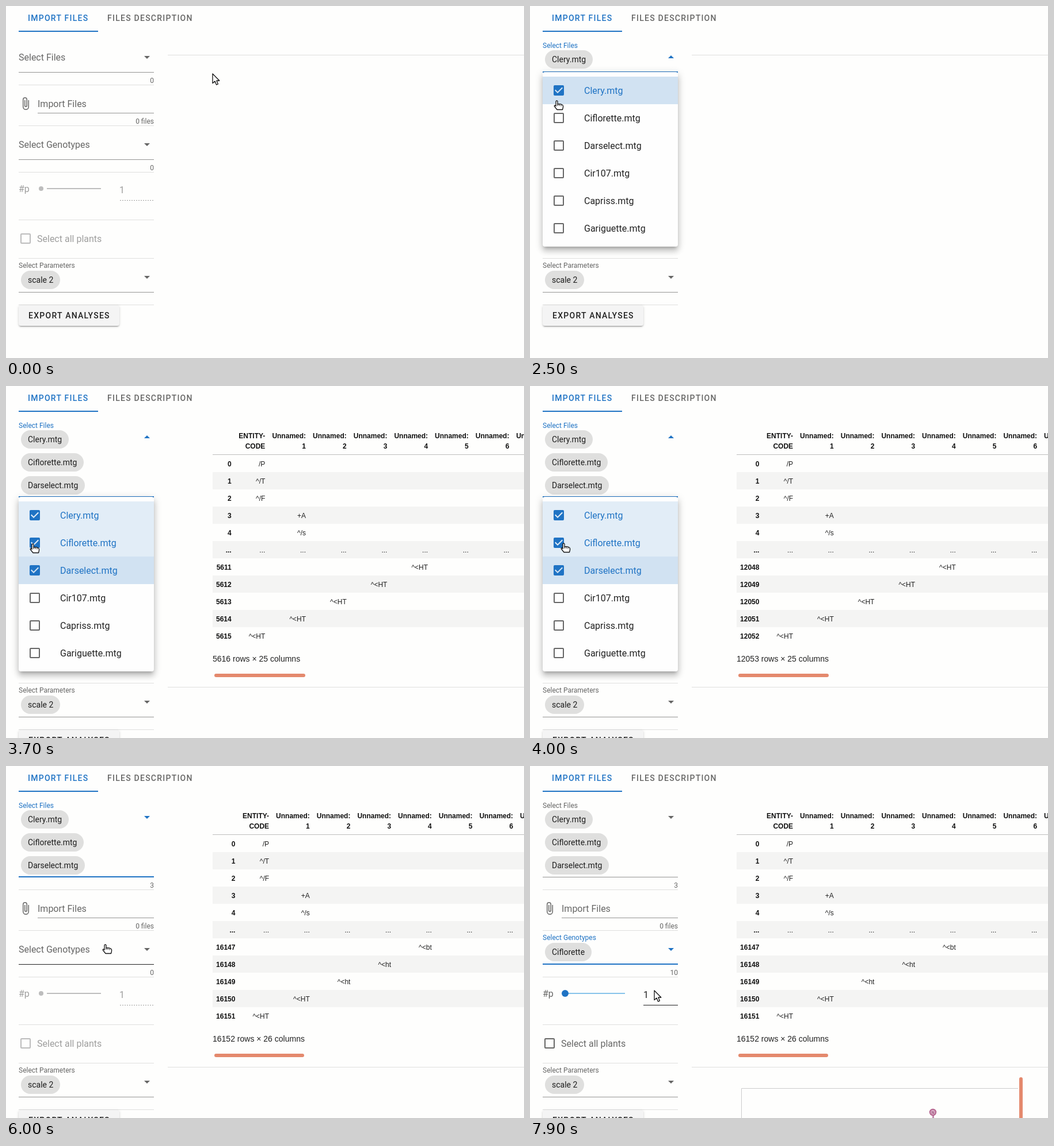
An HTML page for the animation above (8 s loop, 900 by 613 pixels).

```html
<!DOCTYPE html>
<html lang="en">
<head>
<meta charset="utf-8">
<title>Import files</title>
<style>
html, body { margin: 0; width: 100%; height: 100%; overflow: hidden; background: #fefefd; }
#stage { position: relative; width: 900px; height: 613px; overflow: hidden; font: 16px Roboto, sans-serif; }
#stage div, #stage p, #stage svg { position: absolute; margin: 0; white-space: pre; }
#stage svg { width: 1px; height: 1px; overflow: visible; }
#stage .layer { left: 0; width: 900px; }
#stage .caps { font-size: 14px; font-weight: 500; letter-spacing: 1.25px; }
#stage .small { font-size: 12px; }
#stage .cell { font: 12px "Liberation Sans", Arial, sans-serif; }
#stage .head { font: bold 12px "Liberation Sans", Arial, sans-serif; }
#stage .note { font: 14px "Liberation Sans", Arial, sans-serif; }
#stage .chip { left: 26px; padding: 0 12px; border-radius: 16px; background: #dfdfde; color: rgba(0,0,0,.87); font-size: 14px; line-height: 32px; }
.menu { border-radius: 4px; box-shadow: 0 5px 5px -3px rgba(0,0,0,.2), 0 8px 10px 1px rgba(0,0,0,.14), 0 3px 14px 2px rgba(0,0,0,.12); }
.button { border-radius: 4px; box-shadow: 0 3px 1px -2px rgba(0,0,0,.2), 0 2px 2px rgba(0,0,0,.14), 0 1px 5px rgba(0,0,0,.12); }
.round { border-radius: 9px; }
</style>
</head>
<body>
<div id="stage"></div>
<script>
const LOOP = 8000, STEP = 100;
const BLUE = '#1f73c4', CORAL = '#e4896d';
const DARK = 'rgba(0,0,0,.87)', GREY = 'rgba(0,0,0,.6)', FAINT = 'rgba(0,0,0,.38)';
const RULE = 'rgba(0,0,0,.12)', LINE = 'rgba(0,0,0,.42)';
const FILES = ['Clery', 'Ciflorette', 'Darselect', 'Cir107', 'Capriss', 'Gariguette'].map(n => n + '.mtg');
const GENOTYPES = ['Darselect', 'Ciflorette', 'Clery'];

// Distance from the top of a line of text to its baseline, per class
const ASCENT = { '': 15, caps: 13, small: 11, cell: 11, head: 11, note: 13 };

// Moments of the user's actions, in ms
const OPEN_FILES = 1240, PICKS = [2100, 2600, 3400], CLOSE_FILES = 4905;
const OPEN_GENO = 6510, PICK_GENO = 7200, SHOW_PLOT = 7800;
const LABEL_LEAD = 100, MENU_LAG = 20;

// Each table: time shown, last row, column count, right edge of index, bar width, tail cells
const TABLES = [
  [2600, 5615, 25, 391.7, 158, ['HT', 'HT', 'HT', 'HT', 'HT']],
  [3900, 12052, 25, 398.4, 157, ['HT', 'HT', 'HT', 'HT', 'HT']],
  [5200, 16151, 26, 398.4, 156, ['bt', 'ht', 'ht', 'HT', 'HT']]
];

// Pointer path: time, x, y
const PATH = [
  [0, 358.5, 118], [400, 279.5, 98], [500, 279.5, 98], [1000, 248.5, 90], [1400, 248.5, 90],
  [1900, 47, 142], [2300, 47, 142], [2700, 47, 188], [2900, 47, 188], [3340, 47, 275],
  [3800, 47, 275], [4000, 59, 274], [4300, 200, 140], [4400, 200, 140], [4800, 243.5, 93],
  [5250, 243.5, 93], [6200, 164, 339], [6700, 164, 339], [6950, 95, 418], [7300, 95, 418],
  [7900, 215.5, 391]
];

const CLIP = 'M16.5 6V17.5A4 4 0 0 1 8.5 17.5V5A2.5 2.5 0 0 1 13.5 5V15.5A1 1 0 0 1 11.5 15.5V6H10' +
  'V15.5A2.5 2.5 0 0 0 15 15.5V5A4 4 0 0 0 7 5V17.5A5.5 5.5 0 0 0 18 17.5V6Z';
const BOX = 'M19 3H5A2 2 0 0 0 3 5V19A2 2 0 0 0 5 21H19A2 2 0 0 0 21 19V5A2 2 0 0 0 19 3Z';
const HOLE = 'M19 5V19H5V5H19Z';
const TICK = 'M10 17L5 12L6.41 10.58L10 14.17L17.59 6.58L19 8Z';
const ARROW = 'M0 0V16.5L4 13L6.6 19.2L9.4 18L6.9 12H11.8Z';
const HAND = 'M-2 9.5V1.5Q-2 0 -.5 0Q1 0 1 1.5V6Q5 5 9 7Q11 8 10.5 11.5L9.5 15.5H0L-4 10.5Q-5.5 8.5 -4 8Q-3 8 -2 9.5Z';

const stage = document.getElementById('stage');

const lerp = (a, b, p) => a + (b - a) * p;
const clamp = v => Math.max(0, Math.min(1, v));

// cubic-bezier(.25, .8, .5, 1) over 300 ms
function ease(t, start) {
  const x = clamp((t - start) / 300);
  let lo = 0, hi = 1;
  for (let i = 0; i < 18; i++) {
    const s = (lo + hi) / 2, r = 1 - s;
    if (.75 * s * r * r + 1.5 * s * s * r + s ** 3 < x) lo = s; else hi = s;
  }
  const s = x === 1 ? 1 : lo, r = 1 - s;
  return 2.4 * s * r * r + 3 * s * s * r + s ** 3;
}

const escape = s => String(s).replace(/</g, '&lt;');
const put = (side, x, y, s, fill, cls, size) =>
  `<p class="${cls}" style="${side}:${x}px;top:${y - (size ? Math.round(size * .928) : ASCENT[cls])}px;color:${fill};` +
  `${size ? `font-size:${size}px` : ''}">${escape(s)}</p>`;
const text = (x, y, s, fill = DARK, cls = '', size) => put('left', x, y, s, fill, cls, size);
const textEnd = (x, y, s, fill, cls) => put('right', 900 - x, y, s, fill, cls);
const rect = (x, y, w, h, fill, cls = '', opacity = 1) =>
  `<div class="${cls}" style="left:${x}px;top:${y}px;width:${w}px;height:${h}px;background:${fill};opacity:${opacity}"></div>`;
const draw = (x, y, shapes) => `<svg style="left:${x}px;top:${y}px">${shapes}</svg>`;
const path = (d, fill, extra = '') => `<path d="${d}" fill="${fill}" fill-rule="evenodd" ${extra}/>`;
const circle = (x, y, r, fill, extra = '') => draw(x, y, `<circle r="${r}" fill="${fill}" ${extra}/>`);
const layer = (y, opacity, content) => `<div class="layer" style="top:${y}px;opacity:${opacity}">${content}</div>`;
const rule = y => rect(22, y, 235, 1, RULE);
const checkbox = (x, y, on, color) => draw(x - 12, y - 12, path(BOX + (on ? TICK : HOLE), on ? BLUE : color));

// A select field whose underline sits at y; chips start at top
function select({ y, label, chips = [], top = y - 37, cap = y - 42, icon = y - 26, rise = 0,
  focus = 0, active, turn = 0, hover, count }) {
  const color = active ? BLUE : GREY;
  const up = chips.length ? 1 : rise;
  const labelY = chips.length ? cap : lerp(y - 20, y - 40, up);
  let out = text(22, labelY, label, color, '', lerp(16, 12, up));
  chips.forEach((c, i) => out += `<div class="chip" style="top:${top + 40 * i}px">${c}</div>`);
  out += rect(22, y, 235, 1, hover ? DARK : LINE);
  if (focus > 0) out += rect(139.5 - 117.5 * focus, y - 1, 235 * focus, 2, active ? BLUE : DARK);
  out += draw(245, icon, path('M-5 -2L0 3L5 -2Z', color, `transform="rotate(${180 * turn})"`));
  if (count !== undefined) out += textEnd(257, y + 19, count, GREY, 'small') + rule(y + 22);
  return out;
}

function menu({ y, items, opacity, boxes, isOn, current, pointer }) {
  if (opacity <= 0) return '';
  let out = rect(22, 0, 235, items.length * 48 + 16, '#fefefe', 'menu');
  items.forEach((name, i) => {
    const top = 8 + 48 * i, on = isOn(i);
    const hover = pointer.x < 257 && pointer.y >= y + top && pointer.y < y + top + 48;
    if (on) out += rect(22, top, 235, 48, BLUE, '', i === current ? .2 : .12);
    else if (hover) out += rect(22, top, 235, 48, 'rgba(0,0,0,.04)');
    if (boxes) out += checkbox(50, top + 24, on, GREY);
    out += text(boxes ? 94 : 38, top + 30, name, on ? BLUE : DARK);
  });
  return layer(y, opacity, out);
}

function table([, last, cols, edge, bar, tail]) {
  const right = c => edge + 58.67 + 70.67 * c;
  const cell = (c, r, s) => textEnd(right(c), 140 + 30 * r, s, '#222', 'cell');
  const head = (x, y, s) => textEnd(x, y, s, '#111', 'head');
  let out = head(right(0), 91, 'ENTITY-') + head(right(0), 109, 'CODE');
  for (let r = 1; r < 10; r += 2) out += rect(359, 120 + 30 * r, 541, 30, '#f4f4f3');
  out += rect(359, 119, 541, 1, '#bdbdbd');
  for (let c = 1; c < 8; c++) out += head(right(c), 91, 'Unnamed:') + head(right(c), 109, c);
  for (let r = 0; r < 11; r++) {
    out += head(edge, 140 + 30 * r, r < 5 ? r : r === 5 ? '...' : last - 10 + r);
  }
  ['/P', '^/T', '^/F', '+A', '^/s'].forEach((s, r) => out += cell(r > 2 ? 1 : 0, r, s));
  for (let c = 0; c < 8; c++) out += cell(c, 5, '...');
  tail.forEach((s, i) => out += cell(4 - i, 6 + i, '^<' + s));
  return out + text(359, 480, `${last + 1} rows × ${cols} columns`, '#222', 'note') +
    rect(362, 501, bar, 6, CORAL, 'round');
}

function plot() {
  return draw(367, 561, path('M.5 52V.5H481', 'none', 'stroke="#ccc"')) +
    rect(850, 542, 6, 80, CORAL, 'round') + rect(699, 606, 2.5, 8, '#c58aac') +
    circle(700, 603, 5.2, '#d9a9c4', 'stroke="#b5658f" stroke-width="2"') +
    text(697.5, 606, 'N', '#8d4a70', '', 7);
}

function pointerAt(t) {
  let i = 1;
  while (i < PATH.length - 1 && PATH[i][0] < t) i++;
  const [t0, x0, y0] = PATH[i - 1], [t1, x1, y1] = PATH[i];
  const p = clamp((t - t0) / (t1 - t0)), s = p * p * (3 - 2 * p);
  return { x: lerp(x0, x1, s), y: lerp(y0, y1, s) };
}

function cursor({ x, y }, t) {
  const hand = x < 257 && t < 7600;
  let out = path(hand ? HAND : ARROW, '#fff', 'stroke="#111" stroke-width="1.3" stroke-linejoin="round"');
  if (hand) out += path('M1 6V9M4 6V9M7 7V9.5', 'none', 'stroke="#111"');
  return draw(x, y, out);
}

function render(t) {
  const pointer = pointerAt(t);
  const picked = PICKS.filter(p => t >= p).length;
  const shift = [0, 0, 38, 78][picked];
  const fileLine = 115 + shift, genoLine = 267 + shift;
  const inGeno = t >= OPEN_GENO, ready = t >= PICK_GENO;
  const near = (a, b) => pointer.x > 22 && pointer.x < 257 && pointer.y > a && pointer.y < b;
  const filesUp = ease(t, OPEN_FILES + MENU_LAG) - ease(t, CLOSE_FILES);
  const genoUp = ease(t, OPEN_GENO) - ease(t, PICK_GENO);
  const shown = TABLES.filter(k => t >= k[0]).pop();

  let out = text(38, 26, 'IMPORT FILES', BLUE, 'caps') + text(176, 26, 'FILES DESCRIPTION', GREY, 'caps') +
    rect(22, 43, 138, 2, BLUE);
  if (shown) out += table(shown);
  out += rect(281, shown ? 524 : 85, 619, 1, RULE);
  if (t >= SHOW_PLOT) out += plot();

  out += select({
    y: fileLine, top: 77, cap: 73, icon: 89, label: 'Select Files', chips: FILES.slice(0, picked),
    rise: ease(t, OPEN_FILES - LABEL_LEAD), focus: ease(t, OPEN_FILES) - ease(t, OPEN_GENO),
    active: t >= OPEN_FILES && !inGeno, turn: filesUp, hover: near(60, fileLine), count: picked
  });
  out += layer(shift, 1,
    draw(22, 158, path(CLIP, GREY)) + text(55, 176, 'Import Files', GREY) +
    rect(55, 186, 202, 1, near(155 + shift, 187 + shift) ? DARK : LINE) +
    textEnd(257, 205, '0 files', GREY, 'small') + rule(208));
  out += select({
    y: genoLine, label: 'Select Genotypes', chips: ready ? ['Ciflorette'] : [],
    rise: ease(t, OPEN_GENO - LABEL_LEAD), focus: ease(t, OPEN_GENO), active: inGeno, turn: genoUp,
    hover: near(genoLine - 50, genoLine), count: ready ? 10 : 0
  });

  const tone = ready ? GREY : FAINT;
  let lower = text(22, 324, '#p', tone) + text(197, 326, '1', ready ? DARK : FAINT);
  if (ready) {
    lower += rect(61, 317, 104, 2, '#86c3ea') + circle(61, 318, 6, BLUE) +
      rect(197, 338, 60, 1, near(380, 417) ? DARK : LINE);
  } else {
    lower += rect(71, 317, 94, 2, '#bdbdbd') + circle(61, 318, 4, '#bdbdbd') +
      draw(198, 338, path('M0 .5H59', 'none', `stroke="${FAINT}" stroke-dasharray="2 2"`));
  }
  lower += rule(372) + checkbox(34, 405, false, ready ? GREY : '#bcbcbc') +
    text(54, 411, 'Select all plants', tone) + rule(439) +
    select({ y: 498, label: 'Select Parameters', chips: ['scale 2'] }) + rule(520) +
    rect(22, 521, 175, 36, '#f4f4f4', 'button') + text(39, 544, 'EXPORT ANALYSES', DARK, 'caps');
  out += layer(shift, 1, lower);

  out += menu({
    y: fileLine, items: FILES, opacity: filesUp, boxes: true,
    isOn: i => i < picked, current: picked - 1, pointer
  });
  out += menu({
    y: genoLine, items: GENOTYPES, opacity: genoUp,
    isOn: i => ready && i === 1, current: 1, pointer
  });
  stage.innerHTML = out + cursor(pointer, t);
}

const start = performance.now();
let drawn = -1;
function tick() {
  const t = Math.floor((performance.now() - start) % LOOP / STEP) * STEP;
  if (t !== drawn) render(drawn = t);
  requestAnimationFrame(tick);
}
tick();
</script>
</body>
</html>
```
